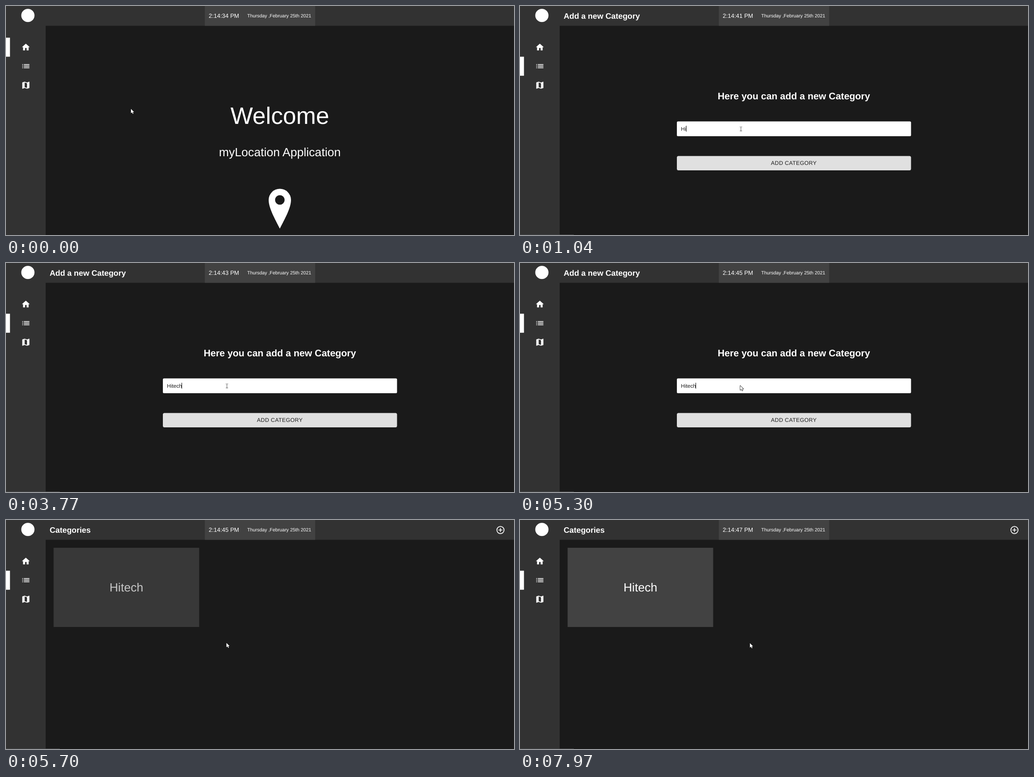
Animation, 1114 px wide and 503 px high, one loop 8000 ms. Source, as an HTML page with a canvas:

```html
<!DOCTYPE html>
<html lang="en">
<head>
<meta charset="utf-8">
<title>Category app</title>
<style>
html, body { margin: 0; width: 100%; height: 100%; overflow: hidden; background: #1a1a1a; }
canvas { display: block; }
</style>
</head>
<body>
<canvas id="stage" width="1114" height="503"></canvas>
<script>
const ctx = document.getElementById('stage').getContext('2d');
const LOOP = 8000;
const ZOOM = 0.87; // the app is shown at 87 %
const CENTER = 600.5;
const FONT = '"Liberation Sans", Arial, sans-serif';

const FORM_AT = 500, LIST_AT = 5370;
const TICKS = [1040, 2170, 3170, 4170, 5170, 6170, 7170];
const KEYS = [2500, 3240, 3570, 3770];
const FADE = [[5570, 0.2], [5640, 0.5], [5700, 0.75], [5770, 0.92], [5840, 1]];

const ICONS = {
  home: new Path2D('M10 20v-6h4v6h5v-8h3L12 3 2 12h3v8z'),
  list: new Path2D('M3 11h2v2H3zM3 15h2v2H3zM3 7h2v2H3zM7 11h14v2H7zM7 15h14v2H7zM7 7h14v2H7z'),
  map: new Path2D('M20.5 3l-.16.03L15 5.1 9 3 3.36 4.9c-.21.07-.36.25-.36.48V20.5c0 .28.22.5.5.5l.16-.03L9 18.9l6 2.1 5.64-1.9c.21-.07.36-.25.36-.48V3.5c0-.28-.22-.5-.5-.5zM15 19l-6-2.11V5l6 2.11z'),
  plus: new Path2D('M11 7h2v4h4v2h-4v4h-2v-4H7v-2h4z')
};
const ARROW = new Path2D('M0 0V16L4 12.6 6.6 18.4 9.2 17.2 6.6 11.6H11.6z');
const PIN = new Path2D('M-24.5 0A24.5 24.5 0 0 1 24.5 0C24.5 18 10.5 42 0 63C-10.5 42-24.5 18-24.5 0z' +
  'M-10.5 0A10.5 10.5 0 1 0 10.5 0A10.5 10.5 0 1 0-10.5 0z');

const passed = (times, t) => times.filter(at => t >= at).length;

function rect(x, y, w, h, color, radius = 0) {
  ctx.fillStyle = color;
  ctx.beginPath();
  ctx.roundRect(x, y, w, h, radius);
  ctx.fill();
}

// size is in app pixels, before the zoom
function text(str, x, y, size, { color = '#fff', align = 'left', weight = 'normal', spacing = 0 } = {}) {
  ctx.font = `${weight} ${size * ZOOM}px ${FONT}`;
  ctx.textRendering = 'geometricPrecision';
  ctx.letterSpacing = `${spacing}px`;
  ctx.textAlign = align;
  ctx.fillStyle = color;
  ctx.fillText(str, x, y);
}

function shape(path, x, y, scale = 1, color = '#fff') {
  ctx.save();
  ctx.translate(x, y);
  ctx.scale(scale, scale);
  ctx.fillStyle = color;
  ctx.fill(path, 'evenodd');
  ctx.restore();
}

function icon(name, cx, cy) {
  shape(ICONS[name], cx - 12 * ZOOM, cy - 12 * ZOOM, ZOOM);
}

function disc(x, y, r) {
  ctx.beginPath();
  ctx.arc(x, y, r, 0, Math.PI * 2);
}

function pointer(x, y) {
  ctx.save();
  ctx.translate(x, y);
  ctx.scale(0.6, 0.6);
  ctx.lineWidth = 2.4;
  ctx.lineJoin = 'round';
  ctx.strokeStyle = '#111';
  ctx.stroke(ARROW);
  ctx.fillStyle = '#fff';
  ctx.fill(ARROW);
  ctx.restore();
}

function beam(x, y) {
  rect(x, y - 4, 1, 9, '#555');
  rect(x - 2, y - 5, 2, 1, '#666');
  rect(x + 1, y - 5, 2, 1, '#666');
  rect(x - 2, y + 4, 2, 1, '#666');
  rect(x + 1, y + 4, 2, 1, '#666');
}

function frame(t) {
  rect(0, 0, 1114, 503, '#1a1a1a');
  rect(0, 0, 1114, 43.5, '#323232');
  rect(0, 0, 87, 503, '#323232');
  rect(436, 0, 242, 43.5, '#424242');

  const second = t < FORM_AT ? 34 : 40 + passed(TICKS, t);
  text(`2:14:${second} PM`, 444.5, 26, 15);
  text('Thursday ,February 25th 2021', 529, 25, 12);

  ctx.fillStyle = '#fff';
  disc(48, 20.7, 14.5);
  ctx.fill();
  rect(0, t < FORM_AT ? 69.6 : 111.4, 8.7, 41.8, '#fff');
  icon('home', 43.5, 90.5);
  icon('list', 43.5, 132.2);
  icon('map', 43.5, 174);
  if (t >= FORM_AT) rect(0, 502, 118, 1, '#46484a');
}

function welcome() {
  text('Welcome', CENTER, 259, 60, { align: 'center' });
  text('myLocation Application', CENTER, 329.5, 30, { align: 'center' });
  shape(PIN, 600.5, 426);
  pointer(274, 226);
}

function form(t) {
  text('Add a new Category', 95.7, 27.6, 20, { weight: 'bold' });
  text('Here you can add a new Category', CENTER, 205, 24, { weight: 'bold', align: 'center' });

  rect(344, 253.5, 513.5, 32.5, '#fff', 2.5);
  const typed = 'Hitech'.slice(0, 2 + passed(KEYS, t));
  text(typed, 353.1, 274, 40 / 3, { color: '#1c1c1c' });
  rect(Math.floor(353.1 + ctx.measureText(typed).width), 263, 1, 13, '#000');

  rect(344, 329.5, 513.5, 31.5, '#e0e0e0', 3.5);
  text('ADD CATEGORY', CENTER, 349.4, 14, { color: 'rgba(0,0,0,.87)', align: 'center', spacing: 0.348 });

  if (t < 5300) beam(484, 270);
  else pointer(483, 269.5);
}

function categories(t) {
  text('Categories', 95.7, 27.6, 20, { weight: 'bold' });
  ctx.strokeStyle = '#fff';
  ctx.lineWidth = 2 * ZOOM;
  disc(1084.3, 22, 9 * ZOOM);
  ctx.stroke();
  icon('plus', 1084.3, 22);

  const step = passed(FADE.map(f => f[0]), t);
  if (step) {
    ctx.globalAlpha = FADE[step - 1][1];
    rect(104.4, 61, 319.2, 174, '#424242');
    // blended against the page, not against the card
    const shade = Math.round(26 + 229 * ctx.globalAlpha);
    ctx.globalAlpha = 1;
    text('Hitech', 264, 156.7, 30, { color: `rgb(${shade},${shade},${shade})`, align: 'center' });
  }

  if (t < 7900) pointer(483.4, 270);
  else if (t < 7970) pointer(493, 270);
  else pointer(504.2, 270.6);
}

function draw(now) {
  const t = now % LOOP;
  frame(t);
  if (t < FORM_AT) welcome();
  else if (t < LIST_AT) form(t);
  else categories(t);
}

let start;
function loop(now) {
  start ??= now;
  draw(now - start);
  requestAnimationFrame(loop);
}
draw(0);
requestAnimationFrame(loop);
</script>
</body>
</html>
```
